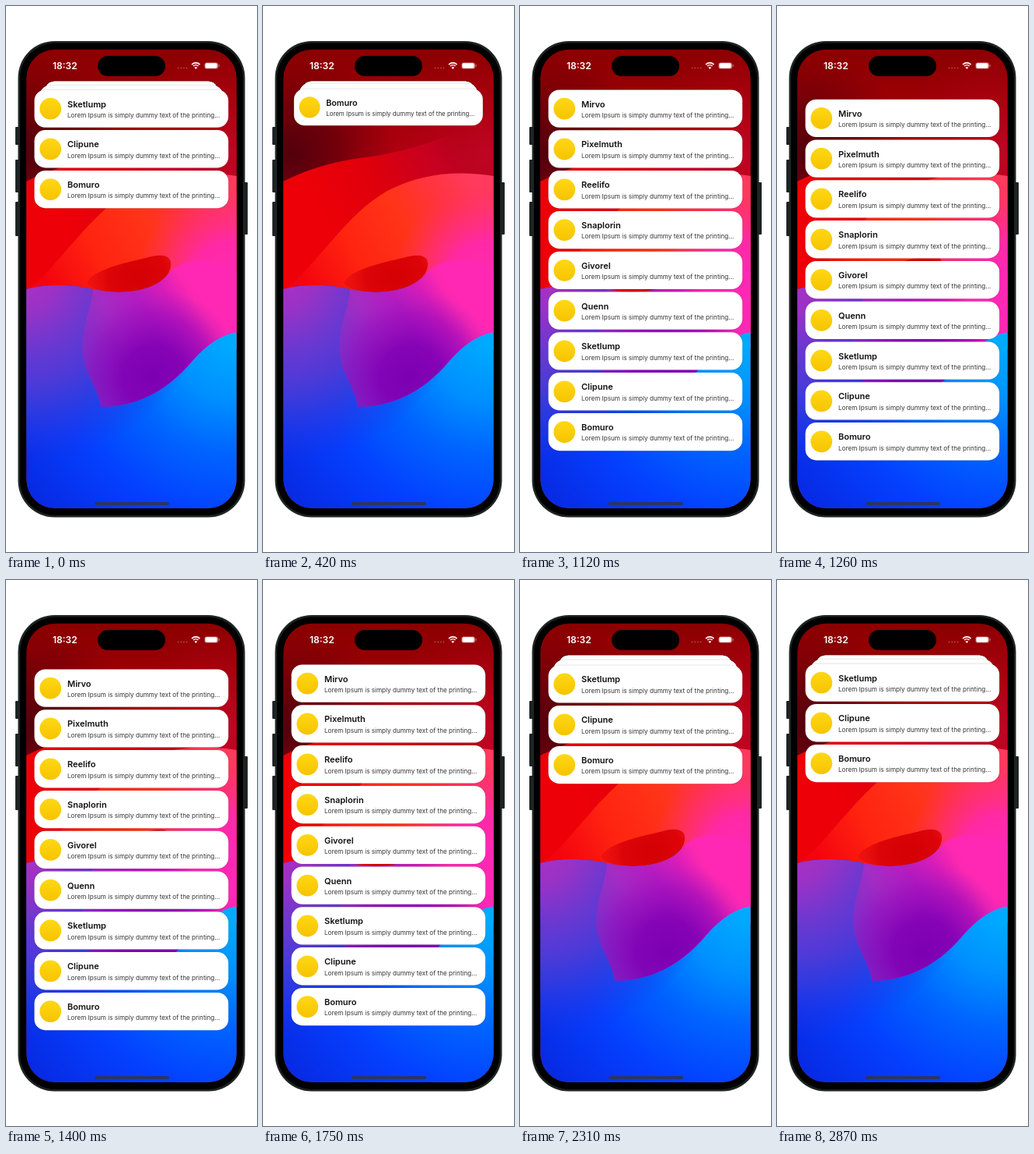
Recreate the animation shown at these times as an HTML page with a canvas. Size 323 by 700 pixels, loop 2910 ms.

```html
<!DOCTYPE html>
<html lang="en">
<head>
<meta charset="utf-8">
<title>Stacked notifications</title>
<style>
html, body { margin: 0; width: 100%; height: 100%; overflow: hidden; background: #fff; }
canvas { display: block; width: 323px; height: 700px; }
</style>
</head>
<body>
<canvas id="stage"></canvas>
<script>
const W = 323, H = 700, LOOP = 2910, STEP = 70;
const PITCH = 51.8, TOP = 107.5, CARD = { x: 36.5, w: 249.7, h: 48.3, r: 14 };
const TITLES = ['Mirvo', 'Pixelmuth', 'Reelifo', 'Snaplorin', 'Givorel', 'Quenn', 'Sketlump', 'Clipune', 'Bomuro'];
const BODY = 'Lorem Ipsum is simply dummy text of the printing...';

// Scroll keys: time (ms), offset (px), velocity (px/ms)
const SCROLL = [
  [0, 311, 0], [420, 440, 0], [560, 440, 0], [1120, 0, -0.3], [1200, -13, 0],
  [1400, -7, 0.04], [1750, -1, 0.01], [1960, 140, 1.1], [2310, 309, 0.05],
  [2560, 311, 0], [LOOP, 311, 0]
];

const scale = window.devicePixelRatio || 1;
const canvas = document.getElementById('stage');
canvas.width = W * scale;
canvas.height = H * scale;
const ctx = canvas.getContext('2d');

function scrollAt(t) {
  const i = SCROLL.findIndex((k, n) => n > 0 && t <= k[0]);
  const [t0, p0, v0] = SCROLL[i - 1], [t1, p1, v1] = SCROLL[i];
  const d = t1 - t0, u = (t - t0) / d, u2 = u * u, u3 = u2 * u;
  return (2 * u3 - 3 * u2 + 1) * p0 + (u3 - 2 * u2 + u) * d * v0
    + (3 * u2 - 2 * u3) * p1 + (u3 - u2) * d * v1;
}

function box(g, x, y, w, h, r, fill) {
  g.beginPath();
  g.roundRect(x, y, w, h, r);
  g.fillStyle = fill;
  g.fill();
}

function disc(g, x, y, r, fill) {
  g.beginPath();
  g.arc(x, y, r, 0, Math.PI * 2);
  g.fillStyle = fill;
  g.fill();
}

function stops(gradient, list) {
  list.forEach(([at, color]) => gradient.addColorStop(at, color));
  return gradient;
}

const linear = (g, x0, y0, x1, y1, list) => stops(g.createLinearGradient(x0, y0, x1, y1), list);
const radial = (g, x, y, r, list) => stops(g.createRadialGradient(x, y, 0, x, y, r), list);

function shape(g, path, fill) {
  g.fillStyle = fill;
  g.fill(new Path2D(path));
}

function drawWallpaper(g) {
  const all = 'M26 55H297V645H26Z';

  // Dark red sky
  shape(g, all, linear(g, 0, 55, 0, 220, [[0, '#8a0000'], [0.5, '#a00006'], [1, '#b40014']]));
  shape(g, all, radial(g, 290, 190, 140, [[0, 'rgba(200,8,46,.65)'], [1, 'rgba(190,0,30,0)']]));
  shape(g, all, radial(g, 38, 190, 130, [[0, 'rgba(72,0,12,.9)'], [0.45, 'rgba(84,0,10,.65)'], [1, 'rgba(100,0,8,0)']]));

  // Red and orange waves
  shape(g, 'M26 225C60 208 95 198 140 193C200 184 250 162 297 142V400H26Z',
    linear(g, 60, 250, 250, 160, [[0, '#ee0008'], [0.45, '#dd000c'], [0.8, 'rgba(205,0,36,.75)'], [1, 'rgba(195,0,36,0)']]));
  shape(g, 'M26 366C72 330 105 268 160 237C202 215 250 210 297 218V440H26Z',
    linear(g, 50, 350, 270, 230, [[0, '#f4040e'], [0.3, '#ff2410'], [0.6, '#ff3418'], [0.82, '#ff3440'], [1, '#ff3a5c']]));
  shape(g, 'M140 372L240 200H297V440H140Z',
    radial(g, 288, 352, 125, [[0, '#ff28b4'], [0.4, 'rgba(255,40,176,.9)'], [0.7, 'rgba(255,44,140,.5)'], [1, 'rgba(255,48,90,0)']]));
  shape(g, 'M104 355C112 338 150 330 180 323C206 315 216 322 211 338C204 358 170 368 142 367C122 366 108 362 104 355Z',
    radial(g, 170, 348, 76, [[0, '#d40004'], [0.5, '#dc0408'], [1, 'rgba(240,22,18,.6)']]));

  // Blue floor, then the violet glow on its left
  const lower = 'M26 363C50 357 80 356 112 363C150 372 195 366 212 340';
  shape(g, lower + 'L297 420V645H26Z', radial(g, 290, 430, 340,
    [[0, '#00acff'], [0.22, '#0090ff'], [0.42, '#0064ff'], [0.66, '#0440ff'], [1, '#0826de']]));
  shape(g, lower + 'L297 420V645H26Z', radial(g, 20, 340, 260,
    [[0, '#b030c2'], [0.19, '#9a32c6'], [0.38, '#6c38d0'], [0.56, '#4c3ad8'], [0.68, 'rgba(56,58,220,.85)'], [0.96, 'rgba(30,50,230,0)']]));

  // Purple lobe melting into pink
  const lobe = 'M112 363C150 372 195 366 212 340C235 320 270 325 297 340V418'
    + 'C272 423 255 438 239 456C205 496 165 514 122 514C118 486 96 466 98 432C100 405 110 385 112 363Z';
  shape(g, lobe, linear(g, 95, 470, 250, 370,
    [[0, '#6836ce'], [0.4, '#a42cc4'], [0.62, '#b81cc0'], [0.8, '#d81cb8'], [0.95, '#fc28b0'], [1, '#ff28b4']]));
  shape(g, lobe, radial(g, 190, 476, 115,
    [[0, '#7c00b2'], [0.35, 'rgba(128,0,180,.9)'], [0.7, 'rgba(146,8,186,.5)'], [1, 'rgba(165,28,192,0)']]));
}

function drawStatus(g) {
  box(g, 118, 64, 87, 26, 13, '#000');
  g.fillStyle = '#fff';
  g.font = '600 12px Inter, sans-serif';
  g.fillText('18:32', 60, 81);
  for (let i = 0; i < 4; i++) disc(g, 221.5 + i * 3.7, 79.5, 0.8, 'rgba(255,255,255,.4)');

  g.strokeStyle = '#fff';
  g.lineWidth = 1.6;
  for (const r of [4.6, 7.4]) {
    g.beginPath();
    g.arc(244.3, 80.3, r, -Math.PI * 0.75, -Math.PI * 0.25);
    g.stroke();
  }
  shape(g, 'M244.3 81L242.4 78.8Q244.3 77.4 246.2 78.8Z', '#fff');
  box(g, 255.5, 72.5, 17.5, 8, 2.6, 'rgba(255,255,255,.45)');
  box(g, 256.5, 73.3, 15, 6.4, 2, '#fff');
  box(g, 273.6, 75, 1, 3, 0.5, 'rgba(255,255,255,.5)');
}

function drawPhone(g) {
  g.fillStyle = '#fff';
  g.fillRect(0, 0, W, H);
  const edge = '#1d2423';
  for (const [x, y, h] of [[12, 155, 23], [12, 197, 42], [12, 251, 44], [306, 226, 67]]) {
    box(g, x, y, 5, h, 1, edge);
  }
  box(g, 15.5, 45, 292, 610.5, 47, edge);
  box(g, 18, 47.5, 287, 605.5, 45, '#000');
  g.save();
  g.beginPath();
  g.roundRect(26.3, 55.7, 270.4, 588.3, 37);
  g.clip();
  drawWallpaper(g);
  g.restore();
  drawStatus(g);
  box(g, 114, 636, 96, 4, 2, '#283663');
}

// Depth 0 is the front of the pile, 2 is its back.
function pileShift(depth) {
  return depth < 1 ? -7 * Math.pow(depth, 1.9) : -7 - 6.3 * (depth - 1);
}

function drawCard(i, scroll) {
  const offset = i * PITCH - scroll;
  const depth = Math.min(2, Math.max(0, -offset / PITCH));
  const zoom = 1 - 0.054 * depth;
  const midX = CARD.x + CARD.w / 2;
  const midY = TOP + CARD.h / 2 + Math.max(0, offset) + pileShift(depth);

  ctx.save();
  ctx.translate(midX, midY);
  ctx.scale(zoom, zoom);
  ctx.translate(-midX, -CARD.h / 2);
  ctx.shadowColor = 'rgba(0,0,0,.3)';
  ctx.shadowBlur = 1.5 * scale;
  box(ctx, CARD.x, 0, CARD.w, CARD.h, CARD.r, '#fff');
  ctx.shadowColor = 'transparent';
  disc(ctx, 57.2, 24.2, 13.9, linear(ctx, 0, 10, 0, 38, [[0, '#ffd814'], [1, '#f6c300']]));
  ctx.fillStyle = '#111';
  ctx.font = '600 11px Inter, sans-serif';
  ctx.fillText(TITLES[i], 79, 22);
  ctx.fillStyle = '#333';
  ctx.font = '400 8.15px Inter, sans-serif';
  ctx.fillText(BODY, 79, 35.4);
  ctx.restore();
}

const backdrop = document.createElement('canvas');
backdrop.width = canvas.width;
backdrop.height = canvas.height;
const back = backdrop.getContext('2d');
back.scale(scale, scale);
drawPhone(back);

const start = performance.now();

function frame() {
  const t = (performance.now() - start) % LOOP;
  const scroll = scrollAt(Math.floor(t / STEP) * STEP);
  ctx.setTransform(scale, 0, 0, scale, 0, 0);
  ctx.drawImage(backdrop, 0, 0, W, H);
  TITLES.forEach((_, i) => drawCard(i, scroll));
  requestAnimationFrame(frame);
}
frame();
</script>
</body>
</html>
```
